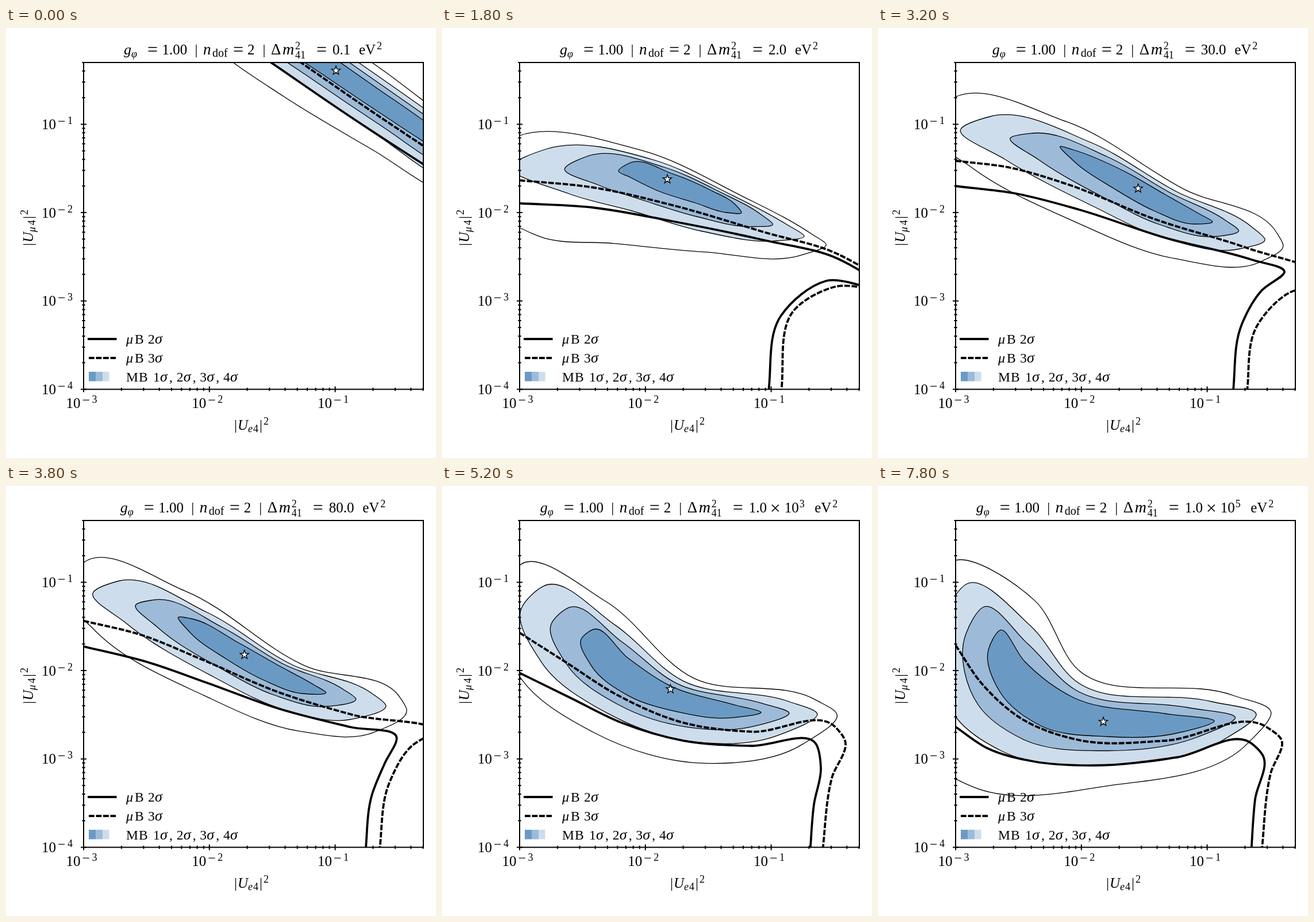
An HTML page that plays this animation: 748 px wide and 748 px high, repeating every 8000 ms.

```html
<!DOCTYPE html>
<html lang="en">
<head>
<meta charset="utf-8">
<title>Allowed regions</title>
<style>
html, body { margin: 0; width: 100%; height: 100%; overflow: hidden; background: #fff; }
svg { display: block; width: 748px; height: 748px; }
text { font-family: "Liberation Serif", "Noto Serif", serif; white-space: pre; }
.i { font-style: italic; }
.axis { fill: none; stroke: #000; stroke-width: 2; }
.region { stroke: #000; stroke-width: 1.3; stroke-linejoin: round; }
.limit { fill: none; stroke: #000; stroke-width: 3.8; stroke-linejoin: round; }
.dash { stroke-dasharray: 9.8 2.7; }
</style>
</head>
<body>
<svg viewBox="0 0 748 748">
  <clipPath id="box"><path d="M135 60H726V628.5H135Z"/></clipPath>
  <g clip-path="url(#box)">
    <path id="s4" class="region" fill="#fff"/>
    <path id="s3" class="region" fill="#cdddeb"/>
    <path id="s2" class="region" fill="#9dbbd8"/>
    <path id="s1" class="region" fill="#6a9ac4"/>
    <path id="solid" class="limit"/>
    <path id="dashed" class="limit dash"/>
    <path id="star" stroke="#000" stroke-width="1.3"/>
  </g>
  <path id="ticks" class="axis"/>
  <path class="axis" d="M135 60H726V628.5H135Z"/>
  <path class="limit" d="M142 541H192.5"/>
  <path class="limit dash" d="M144 574H191"/>
  <path fill="#6a9ac4" d="M144 598h12v16.5h-12z"/>
  <path fill="#9dbbd8" d="M156 598h12v16.5h-12z"/>
  <path fill="#cdddeb" d="M168 598h11.5v16.5h-11.5z"/>
  <g id="labels"></g>
  <g id="ylabel" transform="translate(47 379) rotate(-90)"></g>
  <g id="title"></g>
</svg>
<script>
const $ = id => document.getElementById(id);
const STEP = 200, FRAMES = 40;

function label(parent, x, y, str, size = 25, cls = "") {
  const el = document.createElementNS("http://www.w3.org/2000/svg", "text");
  el.setAttribute("x", x);
  el.setAttribute("y", y);
  el.setAttribute("font-size", size);
  el.setAttribute("class", cls);
  el.textContent = str;
  $(parent).append(el);
  return el;
}

// ---- axes, ticks and fixed text ----
const px = logX => 135 + (logX + 3) * 218.8;
const py = logY => 628.5 - (logY + 4) * 153.7;

function power(x, y, exp) {
  label("labels", x, y, "10");
  label("labels", x + 28, y - 6, "−", 24);
  label("labels", x + 45, y - 9, exp, 18);
}

let ticks = "";
for (let e = 1; e <= 4; e++) {
  for (let m = 1; m < 10; m++) {
    const v = Math.log10(m) - e, r = m > 1 ? 2.7 : 5;
    if (v > -0.3) continue;
    ticks += `M${135 - r} ${py(v)}h${2 * r}`;
    if (e < 4) ticks += `M${px(v)} ${628.5 - r}v${2 * r}`;
  }
  power(62, py(-e) + 8.5, e);
  if (e < 4) power(px(-e) - 30.5, 661, e);
}
$("ticks").setAttribute("d", ticks);

function mixing(parent, x, y, flavour, wide) {
  label(parent, x, y, "|");
  label(parent, x + 6, y, "U", 25, "i");
  label(parent, x + 24, y + 4, flavour, 18, "i");
  label(parent, x + 33 + wide, y + 4, "4", 18);
  label(parent, x + 44 + wide, y, "|");
  label(parent, x + 51 + wide, y - 9, "2", 18);
}
mixing("labels", 397, 699, "e", 0);
mixing("ylabel", 0, 0, "μ", 3);

function sigma(x, y, n) {
  label("labels", x, y, n, 23.5);
  label("labels", x + 12, y, "σ", 26, "i");
}
for (const n of [2, 3]) {
  const y = 483 + 33 * n;
  label("labels", 209, y, "μ", 24, "i");
  label("labels", 224, y, "B", 23.5);
  sigma(247, y, n);
}
label("labels", 209, 615, "M", 23.5);
label("labels", 231, 615, "B", 23.5);
for (let n = 1; n <= 4; n++) {
  const x = 215.5 + 40.6 * n;
  sigma(x, 615, n);
  if (n < 4) label("labels", x + 28, 615, ",", 23.5);
}

// ---- title with the running mass value ----
const put = (...a) => label("title", ...a);
put(205, 46, "g", 26, "i"); put(218, 51, "φ", 18, "i");
put(246, 48, "=", 32); put(271.5, 46, "1.00");
put(328.5, 46, "|"); put(343, 46, "n", 27, "i"); put(359, 50, "dof", 20);
put(395, 48, "=", 32); put(420, 46, "2"); put(446.5, 46, "|");
put(461, 46, "Δ", 27); put(481, 46, "m", 28, "i");
put(503, 37, "2", 18); put(503, 53, "41", 18);
put(540, 48, "=", 32);
const value = put(568, 46, "");
const times = put(605, 49, "×", 32), ten = put(630, 46, "10"), expo = put(656, 37, "", 18);
const unit = put(614, 46, "eV"), square = put(645, 37, "2", 18);

function setTitle(frame) {
  const mass = 10 ** (-1 + 6 * frame / (FRAMES - 1) + 1e-9);
  const e = Math.floor(Math.log10(mass)), sci = e >= 3;
  value.textContent = (sci ? mass / 10 ** e : Number(mass.toPrecision(1))).toFixed(1);
  expo.textContent = e;
  for (const el of [times, ten, expo]) el.setAttribute("visibility", sci ? "visible" : "hidden");
  const extra = sci ? 68.5 : (value.textContent.length - 3) * 12.5;
  unit.setAttribute("x", 614 + extra);
  square.setAttribute("x", 645 + extra);
  $("title").setAttribute("transform", `translate(${-extra / 2} 0)`);
}

// ---- key poses: x,y pairs; loops run left tip, upper edge, right tip, lower edge ----
const poses = [];
const pose = (frame, shape) => poses.push({ frame, ...shape });

pose(0, {
  star: [574, 74], sag: [25],
  inner: [380,-50, 450,-30, 560,45, 640,101, 740,171, 860,270, 760,218, 660,154, 560,87, 460,18],
  outer: [260,-130, 440,-66, 566,27, 652,87, 754,159, 930,290, 772,268, 648,188, 515,98, 390,8],
  solid: [135,-150, 300,-50, 461,60, 600,155, 726,237, 770,265, 850,650, 820,720, 800,800],
  dashed: [135,-190, 320,-73, 513,60, 620,134, 726,205, 790,247, 870,680, 840,750, 820,820]
});
pose(4, {
  star: [392, 147], sag: [30],
  inner: [281,104, 303,98, 400,139, 500,197, 585,251, 626,279, 590,281, 500,240, 400,184, 305,121],
  outer: [95,75, 190,10, 385,113, 515,184, 680,282, 1000,470, 670,352, 525,287, 375,210, 200,131],
  solid: [135,149, 260,168, 400,219, 550,292, 720,390, 770,425, 800,590, 760,660, 720,760],
  dashed: [135,112, 250,131, 400,185, 560,273, 715,362, 775,398, 830,620, 780,690, 740,780]
});
pose(9, {
  star: [392, 263], sag: [60],
  inner: [307,249, 326,235, 402,254, 467,282, 510,307, 521,321, 495,321, 440,304, 375,283, 326,259],
  outer: [120,240, 180,211, 370,230, 497,287, 600,342, 630,362, 585,370, 450,353, 330,318, 220,288],
  solid: [135,305, 260,312, 400,336, 560,369, 690,402, 780,462, 668,440, 590,500, 567,640],
  dashed: [135,265, 260,277, 400,308, 560,355, 690,394, 790,460, 684,450, 615,488, 589,640]
});
pose(16, {
  star: [452.5, 279], sag: [15],
  inner: [317,206, 340,212, 430,250, 500,290, 560,324, 582,337, 550,341, 480,318, 410,279, 340,231],
  outer: [144,176, 195,154, 370,199, 520,285, 650,346, 673,368, 630,384, 500,366, 370,308, 220,228],
  solid: [135,275, 240,288, 350,316, 500,365, 650,403, 707,424, 667,457, 633,515, 617,640],
  dashed: [135,231, 230,243, 330,272, 480,332, 640,382, 790,440, 711,463, 660,517, 641,640]
});
pose(22, {
  star: [377, 308], sag: [25],
  inner: [283,250, 302,249, 380,296, 440,330, 510,367, 531,381, 480,381, 420,359, 355,322, 297,275],
  outer: [159,195, 195,177, 330,241, 480,339, 622,375, 648,394, 570,428, 470,413, 350,355, 195,247],
  solid: [135,283, 250,324, 350,369, 450,410, 550,436, 652,451, 651,507, 640,560, 633,640],
  dashed: [135,238, 240,275, 350,331, 470,386, 570,415, 690,419, 700,442, 674,515, 657,640]
});
pose(31, {
  star: [423, 410], sag: [15],
  inner: [192,285, 212,251, 255,305, 340,368, 500,396, 585,409, 510,432, 400,436, 285,418, 212,358],
  outer: [112,235, 155,170, 265,243, 345,340, 580,375, 658,397, 600,442, 400,485, 215,448, 145,380],
  solid: [135,378, 190,424, 270,467, 380,484, 520,472, 650,448, 669,468, 656,545, 649,640],
  dashed: [135,277, 180,343, 250,405, 350,442, 500,443, 677,420, 701,440, 683,500, 667,640]
});
pose(39, {
  ...poses.at(-1), frame: 39, star: [392, 410], sag: [60],
  outer: [112,235, 155,170, 265,243, 345,340, 580,375, 658,397, 600,442, 400,485, 215,461, 137,404],
  solid: [135,419, 190,456, 270,479, 380,486, 520,472, 650,448, 669,468, 656,545, 649,640]
});

const mix = (a, b, t) => a.map((v, i) => v + (b[i] - v) * t);

function poseAt(frame) {
  const i = Math.max(1, poses.findIndex(p => p.frame >= frame));
  const a = poses[i - 1], b = poses[i], t = (frame - a.frame) / (b.frame - a.frame);
  const shape = {};
  for (const k of ["star", "sag", "inner", "outer", "solid", "dashed"]) shape[k] = mix(a[k], b[k], t);
  return shape;
}

// The widest loop continues the step from inner to outer, less at its tips, and sags at lower left.
function widest({ inner, outer, sag }) {
  return outer.map((v, j) => {
    const turn = 2 * Math.PI * (j >> 1) / 10;
    const reach = 0.75 - 0.4 * Math.cos(turn) ** 2;
    const drop = j % 2 ? sag[0] * Math.max(0, Math.cos(turn + Math.PI / 5)) ** 3 : 0;
    return v + reach * (v - inner[j]) + drop;
  });
}

// Smooth cubic path through the points, with tangents weighted by chord length.
function spline(flat, closed) {
  const n = flat.length / 2;
  const at = i => [0, 1].map(k => flat[2 * ((i + n) % n) + k]);
  const chord = i => {
    const [x0, y0] = at(i), [x1, y1] = at(i + 1), d = Math.hypot(x1 - x0, y1 - y0);
    return { d, dir: [(x1 - x0) / d, (y1 - y0) / d] };
  };
  const tangent = i => {
    const a = chord(i - 1), b = chord(i);
    if (!closed && i === 0) return b.dir;
    if (!closed && i === n - 1) return a.dir;
    return mix(a.dir, b.dir, a.d / (a.d + b.d));
  };
  let d = "M" + at(0);
  for (let i = 0; i < (closed ? n : n - 1); i++) {
    const h = chord(i).d / 3, m0 = tangent(i), m1 = tangent(i + 1), end = at(i + 1);
    d += "C" + [at(i).map((v, k) => v + h * m0[k]), end.map((v, k) => v - h * m1[k]), end];
  }
  return d + (closed ? "Z" : "");
}

function starPath([x, y]) {
  const pts = Array.from({ length: 10 }, (_, i) => {
    const r = i % 2 ? 3.1 : 8, a = i * Math.PI / 5;
    return [x + r * Math.sin(a), y - r * Math.cos(a)];
  });
  return "M" + pts.join("L") + "Z";
}

const setPath = (id, d) => $(id).setAttribute("d", d);
let shown = -1;

function draw() {
  const frame = Math.floor(performance.now() / STEP) % FRAMES;
  if (frame !== shown) {
    shown = frame;
    const p = poseAt(frame);
    setPath("s1", spline(p.inner, true));
    setPath("s2", spline(mix(p.inner, p.outer, 0.5), true));
    setPath("s3", spline(p.outer, true));
    setPath("s4", spline(widest(p), true));
    setPath("solid", spline(p.solid, false));
    setPath("dashed", spline(p.dashed, false));
    setPath("star", starPath(p.star));
    $("star").setAttribute("fill", frame >= 20 && frame <= 25 ? "#000" : "#fff");
    setTitle(frame);
  }
  requestAnimationFrame(draw);
}
draw();
</script>
</body>
</html>
```
